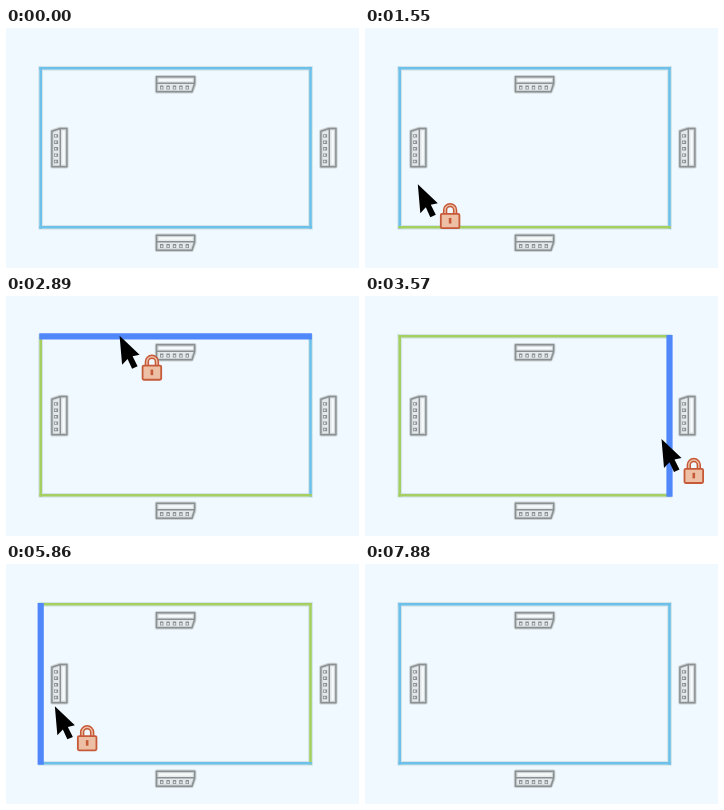
Recreate the animation shown at these times as an HTML page. Size 353 by 240 pixels, loop 8.23 s.

```html
<!DOCTYPE html>
<html lang="en">
<head>
<meta charset="utf-8">
<title>Edge constraints</title>
<style>
  html, body { margin: 0; width: 100%; height: 100%; overflow: hidden; background: #f0f9ff; }
  svg { display: block; width: 353px; height: 240px; }
  .soft { fill: none; stroke: #d3e5e8; stroke-width: 4.8; }
  .edge { stroke: #6cc0ea; stroke-width: 2.6; }
  .edge.locked { stroke: #a5d061; }
  .edge.hover { stroke: #5087fa; stroke-width: 6.2; }
  .lock { stroke: #c65a38; stroke-width: 1.8; }
  .halo { fill: #fdf020; fill-opacity: .38; }
</style>
</head>
<body>
<svg viewBox="0 0 353 240">
  <defs>
    <g id="mark" fill="none" stroke="#8b9092" stroke-width="1.5" stroke-linejoin="round">
      <path d="M-19-7.6H19.2V0L16.5 7.4H-19Z" fill="#e4eaec" stroke="#cdd3d5" stroke-width="3.4"/>
      <path d="M-19-7.6H19.2V-1L16.5 7.4H-19ZM-19-1H19"/>
      <path d="M-16.5-4.3H17" stroke="#f8fbfc" stroke-width="2"/>
      <path d="M-15.5 3.2H16" stroke-width="4" stroke-dasharray="3.4 3"/>
      <path d="M-14.6 3.6H15" stroke="#e9eff1" stroke-width="1.6" stroke-dasharray="1.6 4.8"/>
    </g>
  </defs>
  <rect class="soft" x="34.7" y="40.3" width="269.8" height="159"/>
  <g id="edges"></g>
  <use href="#mark" transform="translate(169.5 56.3)"/>
  <use href="#mark" transform="translate(169.5 214.8)"/>
  <use href="#mark" transform="matrix(0 -1 -1 0 53.3 119.7)"/>
  <use href="#mark" transform="matrix(0 -1 -1 0 322.3 119.7)"/>
  <g id="pointer">
    <circle class="halo" cy=".6" r="21"/>
    <path d="M.5 0L3 29L8.5 23.2L13 33L18.5 30.6L13.5 20.6L20.5 19Z"/>
    <g class="lock" fill="none">
      <path id="shackle" d="M27.8 30V26a5 5 0 0 1 10 0V30" stroke-width="4.4"/>
      <use href="#shackle" style="stroke: #edc1a8" transform="translate(0 .3)" visibility="hidden"/>
      <path d="M27.8 30V26a5 5 0 0 1 10 0V30" stroke="#edc1a8" stroke-width="1.4"/>
      <rect x="23.5" y="29.8" width="18.6" height="14.2" rx="1.2" fill="#edbfa4"/>
      <path d="M32.8 33.8v5.6" stroke-width="2.6"/>
    </g>
    <circle class="halo" cy=".6" r="21"/>
  </g>
</svg>
<script>
const LOOP = 8230, CLICK = 140, REACH = 15;
const L = 34.7, R = 304.5, T = 40.3, B = 199.3, END = 1.4;

const row = y => ({ d: `M${L - END} ${y}H${R + END}`, gap: p => Math.abs(p.y - y) });
const column = x => ({ d: `M${x} ${T - END}V${B + END}`, gap: p => Math.abs(p.x - x) });
const edges = { top: row(T), right: column(R), bottom: row(B), left: column(L) };

// The pointer reaches each stop at `at`, clicks its edge, then leaves;
// `bend` pulls the way there into a curve.
const stop = (edge, at, click, leave, x, y, bend) => ({ edge, at, click, leave, x, y, bend });
const stops = [
  stop(null, 530, null, 530, 272, 106),
  stop('bottom', 940, 940, 1080, 227, 197, { x: 255, y: 175 }),
  stop('left', 1680, 1750, 1890, 35, 140, { x: 60, y: 180 }),
  stop('top', 2490, 2690, 2830, 96, 38, { x: 65, y: 75 }),
  stop('right', 3570, 3760, 4090, 296, 143, { x: 200, y: 45 }),
  stop('bottom', 4490, 4820, 4960, 270, 196, { x: 330, y: 190 }),
  stop('left', 5660, 5660, 5800, 37, 161, { x: 80, y: 195 }),
  stop('top', 6390, 6390, 6530, 110, 44, { x: 94, y: 67 }),
  stop('right', 7000, 7270, 7740, 301, 142, { x: 215, y: 60 }),
  stop(null, 7880, null, 7880, 349, 238, { x: 325, y: 190 })
];
const clicks = stops.filter(s => s.edge);

const pointer = document.getElementById('pointer');
const halos = document.querySelectorAll('.halo');
const layer = document.getElementById('edges');

for (const edge of Object.values(edges)) {
  edge.node = document.createElementNS('http://www.w3.org/2000/svg', 'path');
  edge.node.setAttribute('d', edge.d);
  layer.append(edge.node);
}

const curve = (a, b, c, u) => (1 - u) ** 2 * a + 2 * u * (1 - u) * b + u * u * c;

function pointerAt(t) {
  const i = stops.findIndex(s => t < s.leave);
  if (i < 1) return null;
  const from = stops[i - 1], to = stops[i];
  const u = Math.min(1, (t - from.leave) / (to.at - from.leave));
  return { x: curve(from.x, to.bend.x, to.x, u), y: curve(from.y, to.bend.y, to.y, u) };
}

function hoveredEdge(pos) {
  if (!pos) return null;
  const [best] = Object.values(edges).sort((a, b) => a.gap(pos) - b.gap(pos));
  return best.gap(pos) <= REACH ? best : null;
}

function draw(t) {
  const pos = pointerAt(t), hover = hoveredEdge(pos);
  for (const [name, edge] of Object.entries(edges)) {
    const count = clicks.filter(s => s.edge === name && t >= s.click + CLICK / 2).length;
    const state = edge === hover ? ' hover' : count % 2 ? ' locked' : '';
    edge.node.setAttribute('class', 'edge' + state);
  }
  if (hover && layer.lastChild !== hover.node) layer.append(hover.node);

  pointer.style.display = pos ? '' : 'none';
  if (pos) pointer.setAttribute('transform', `translate(${pos.x} ${pos.y})`);
  const pressed = clicks.some(s => t >= s.click && t < s.click + CLICK);
  halos.forEach(halo => halo.style.display = pressed ? '' : 'none');
}

const start = performance.now();
function tick() {
  draw((performance.now() - start) % LOOP);
  requestAnimationFrame(tick);
}
tick();
</script>
</body>
</html>
```
